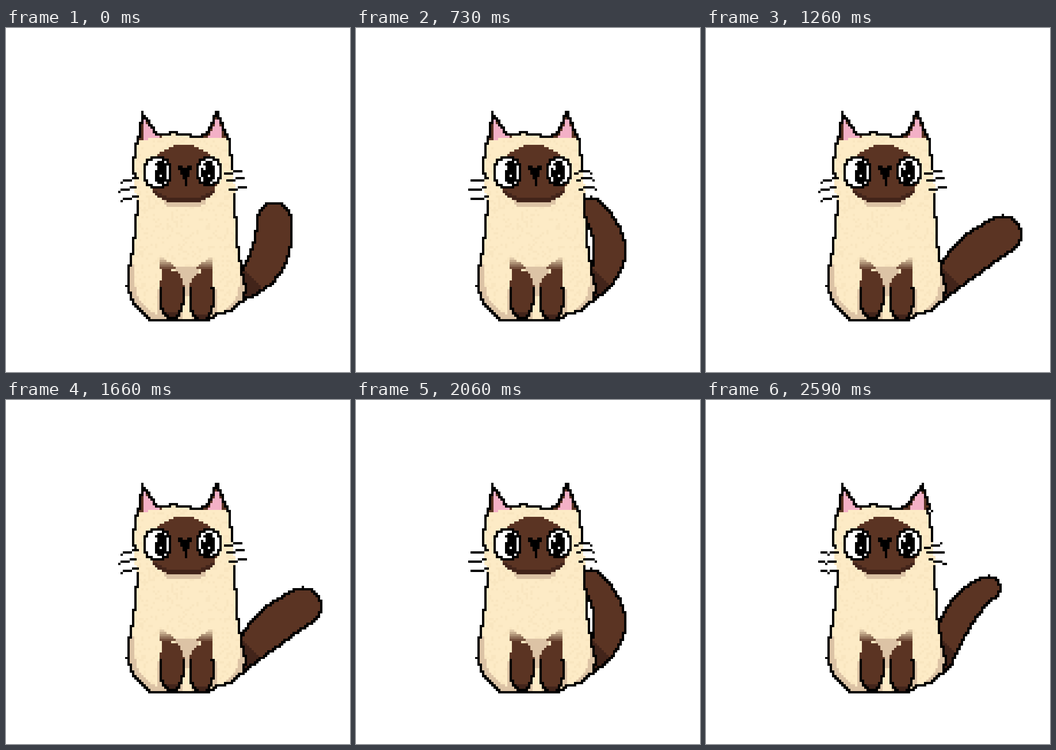
Write an HTML page with a canvas that moves like this. It is 748 px wide and 748 px high and loops after 2.79 s.

```html
<!DOCTYPE html>
<html lang="en">
<head>
<meta charset="utf-8">
<title>Sitting cat</title>
<style>
html, body { margin: 0; width: 100%; height: 100%; overflow: hidden; background: #fff; }
canvas { display: block; width: 100vw; height: 100vh; image-rendering: pixelated; }
</style>
</head>
<body>
<canvas width="150" height="150"></canvas>
<script>
const SIZE = 150;
const ctx = document.querySelector('canvas').getContext('2d');
const BLACK = '#000', WHITE = '#fff', CREAM = '#fdebc6', SPECK = '#f9e6c0', TAN = '#dcc3a5',
  BROWN = '#5b3423', DARK = '#42241a', PINK = '#f3b0c6';

function rect(x, y, w, h, color) {
  ctx.fillStyle = color;
  ctx.fillRect(x, y, w, h);
}

// Colours every cell for which inside(x, y) holds; color(x, y, onEdge) picks the colour.
function paint(inside, color) {
  const mask = [];
  for (let i = 0; i < SIZE * SIZE; i++) mask.push(inside(i % SIZE, Math.floor(i / SIZE)));
  const around = [1, SIZE - 1, SIZE, SIZE + 1];
  mask.forEach((isIn, i) => {
    if (!isIn) return;
    const onEdge = around.some(d => !mask[i - d] || !mask[i + d]);
    const x = i % SIZE, y = Math.floor(i / SIZE);
    rect(x, y, 1, 1, color(x, y, onEdge));
  });
}
const flat = color => () => color;
const outlined = color => (x, y, onEdge) => onEdge ? BLACK : color;

const oval = (cx, cy, rx, ry, power = 2) => (x, y) =>
  Math.abs((x - cx) / rx) ** power + Math.abs((y - cy) / ry) ** power <= 1;

// Corners in clockwise order.
const triangle = (...corners) => (x, y) => corners.every(([ax, ay], i) => {
  const [bx, by] = corners[(i + 1) % 3];
  return (bx - ax) * (y - ay) >= (by - ay) * (x - ax);
});

// Straight pieces between [y, x] points give the x of a side at height y.
function sideAt(points, y) {
  const i = Math.max(1, points.findIndex(p => p[0] >= y));
  const [y0, x0] = points[i - 1], [y1, x1] = points[i];
  return Math.round(x0 + (x1 - x0) * (y - y0) / (y1 - y0));
}

const leftSide = [[46, 58], [50, 56], [60, 55], [75, 57], [95, 55], [105, 53], [114, 53], [120, 55], [127, 62]];
const rightSide = [[46, 95], [50, 97], [60, 98], [75, 99], [95, 100.5], [104, 102], [113, 104], [119, 102.5],
  [123, 98], [125, 91], [127, 88]];

function inBody(x, y) {
  const top = Math.round(46 - 0.7 * Math.sin((x - 67.5) * Math.PI / 10));
  return y >= top && y <= 127 && x >= sideAt(leftSide, y) && x <= sideAt(rightSide, y);
}

const leftEar = {
  outer: triangle([56.6, 49], [58.9, 35.5], [67, 47]),
  inner: triangle([59, 49], [60, 40], [66.5, 47])
};
const rightEars = {
  up: {
    outer: triangle([86, 47], [91.5, 34.5], [97, 48]),
    inner: triangle([87.5, 48], [92, 37.5], [94, 48])
  },
  turned: {
    outer: triangle([85, 47], [94, 35.5], [98, 48]),
    inner: triangle([87.5, 48], [93.5, 37.5], [95, 48])
  }
};

// The tail is a row of discs along a quadratic curve, thickest in the middle.
function drawTail({ bend, end, tip }) {
  const base = [102, 113];
  const discs = Array.from({ length: 41 }, (_, i) => {
    const t = i / 40;
    const along = k => (1 - t) ** 2 * base[k] + 2 * t * (1 - t) * bend[k] + t * t * end[k];
    return [along(0), along(1), 5.5 + (tip - 5.5) * t + 1.8 * Math.sin(Math.PI * t)];
  });
  paint((x, y) => discs.some(([cx, cy, r]) => Math.hypot(x - cx, y - cy) <= r),
    (x, y, onEdge) => onEdge ? BLACK : x < 111 && y > x + 1 ? DARK : BROWN);
}

const litBelly = oval(78.5, 100, 23.5, 26, 3);

function furColor(x, y) {
  const fromMiddle = Math.abs(x - 78.5);
  const shaded = y > 102 && !litBelly(x, y) || y > 113 && fromMiddle < 13 || y > 103 && fromMiddle < 5;
  if (shaded && !(y > 116 && fromMiddle < 2)) return TAN;
  const noise = Math.sin(x * 12.9898 + y * 78.233) * 43758.5453;
  return noise - Math.floor(noise) < 0.2 ? SPECK : CREAM;
}

function drawBody(rightEar) {
  const ears = [leftEar, rightEar];
  paint((x, y) => inBody(x, y) || ears.some(ear => ear.outer(x, y)), (x, y, onEdge) => {
    const whiskerGap = x < 78 ? y > 64 && y < 75 : y > 61 && y < 72;
    if (onEdge && !whiskerGap) return BLACK;
    const ear = ears.find(e => e.outer(x, y));
    if (ear) return ear.inner(x, y) ? PINK : BROWN;
    return furColor(x, y);
  });
  rect(52, 112, 1, 1, BLACK);
}

function drawLeg(cx, cy, outward) {
  const round = oval(cx, cy, 5.5, 10.6, 2.5);
  const thigh = (x, y) => y > 104 && y < cy && (x - cx) * outward >= 0 && (x - cx) * outward <= 4.7;
  paint((x, y) => round(x, y) || thigh(x, y), (x, y, onEdge) =>
    onEdge && y > 112 ? BLACK : y > cy + 7 ? DARK : BROWN);
  for (let i = 0; i < 5; i++) {
    const width = Math.round(2 + 1.3 * i);
    const outer = outward < 0 ? 67 : 90 - width;
    ctx.globalAlpha = (i + 1) / 6;
    rect(outer, 100 + i, width, 1, BROWN);
  }
  ctx.globalAlpha = 1;
}

function drawEye(cx, cy, rx, ry, pupilX) {
  paint(oval(cx, cy, rx, ry, 2.4), outlined(WHITE));
  paint(oval(pupilX, 62.3, 3, 5), flat(BLACK));
  rect(Math.round(pupilX) - 2, 60, 1, 2, WHITE);
  rect(Math.round(pupilX), 64, 1, 1, WHITE);
}

function drawFace() {
  const upper = oval(77, 63, 14.5, 12.5), lower = oval(77, 63, 14.5, 12.5, 3);
  const mask = (x, y) => (y < 63 ? upper : lower)(x, y);
  paint((x, y) => y > 70 && Math.abs(x - 77.5) < 9 && mask(x, y - 2), flat(TAN));
  paint(mask, (x, y) => y > 70 && !mask(x, y + 2) ? DARK : BROWN);
  drawEye(65.5, 62.5, 6.2, 7.2, 67);
  drawEye(88, 62, 5.6, 6.6, 87.7);
  paint(triangle([74.5, 60], [80.5, 60], [78, 68]), flat(BLACK));
  rect(77, 60, 2, 1, BROWN);
}

// Height of a whisker cell at step s from the cheek; row is 0 to 2 from the top.
const whiskerBends = {
  droop: (s, row, side) => side < 0 ? s / 4.5 : -s / 7,
  wave: (s, row, side) => side < 0 ? 0.6 + 0.9 * Math.sin(s * Math.PI / 8) : (row - 1) * (s / 4 - 1),
  level: (s, row, side) => side < 0 ? Math.min(1, s / 4) : -0.9 * Math.sin(s * Math.PI / 8)
};

function drawWhiskers(bend) {
  const roots = [[57, 65, -1], [56, 69, -1], [57, 73, -1], [95, 63, 1], [96, 66, 1], [97, 70, 1]];
  roots.forEach(([x, y, side], i) => {
    for (let s = 0; s < 8; s++) rect(x + s * side, y + Math.round(bend(s, i % 3, side)), 1, 1, BLACK);
  });
}

function draw({ tail, whiskers = 'droop', ear = 'up' }) {
  rect(0, 0, SIZE, SIZE, WHITE);
  drawTail(tail);
  drawBody(rightEars[ear]);
  drawLeg(71.7, 116, -1);
  drawLeg(84.8, 117, 1);
  drawFace();
  drawWhiskers(whiskerBends[whiskers]);
}

const swing = [
  { hold: 330, tail: { bend: [117, 104], end: [116.5, 83], tip: 8 } },
  { hold: 200, tail: { bend: [109, 88], end: [123, 81.5], tip: 5.5 }, whiskers: 'wave', ear: 'turned' },
  { hold: 200, tail: { bend: [115, 104], end: [116, 82], tip: 8 }, whiskers: 'wave', ear: 'turned' },
  { hold: 330, tail: { bend: [118.5, 97], end: [102, 78.5], tip: 5.5 }, whiskers: 'level' },
  { hold: 200, tail: { bend: [113, 100], end: [118, 84], tip: 8 } },
  { hold: 200, tail: { bend: [113, 98], end: [129, 89.5], tip: 8.5 } },
  { hold: 200, tail: { bend: [116, 103], end: [131, 92.5], tip: 8.2 } }
];
const timeline = [...swing, ...swing.slice(1, -1).reverse()];
const loop = timeline.reduce((sum, pose) => sum + pose.hold, 0);
let shown;

function tick() {
  let rest = performance.now() % loop;
  const pose = timeline.find(({ hold }) => (rest -= hold) < 0);
  if (pose !== shown) draw(shown = pose);
  requestAnimationFrame(tick);
}
tick();
</script>
</body>
</html>
```
